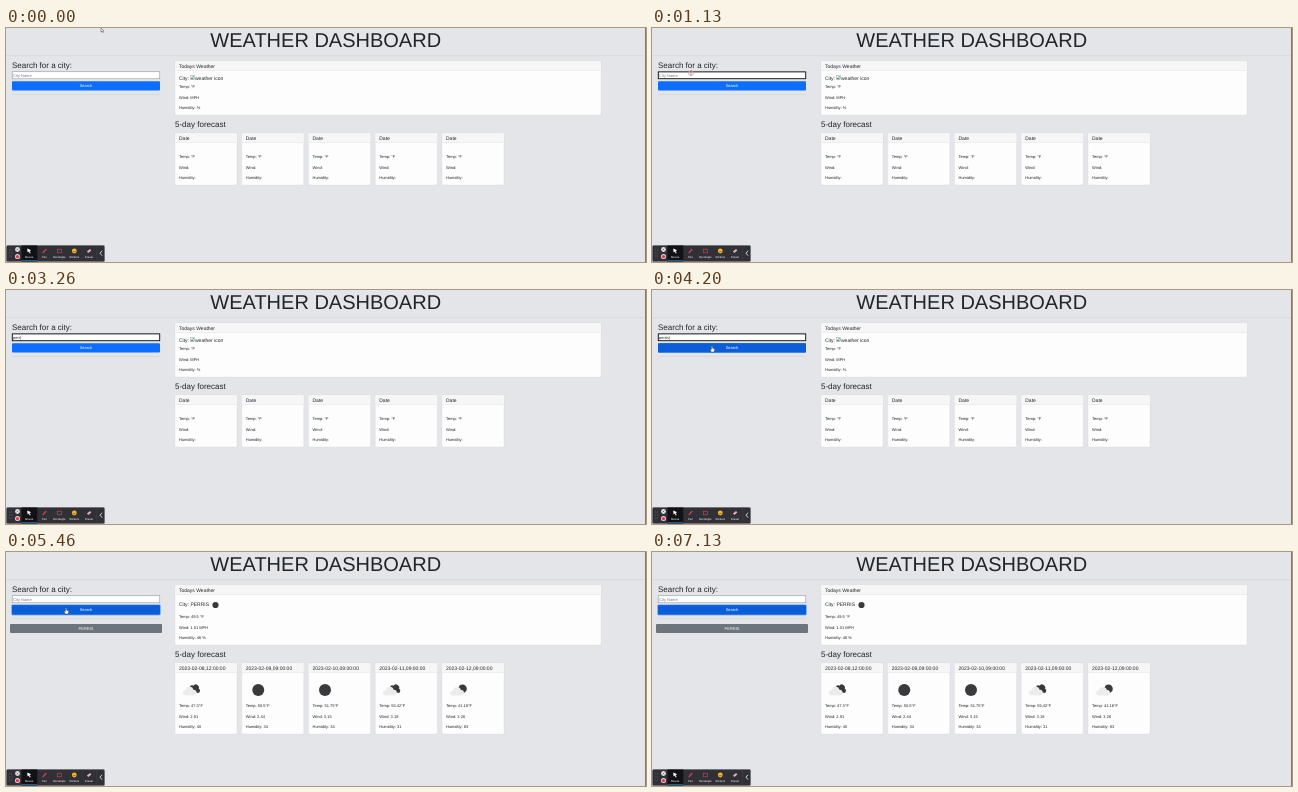
An HTML page for the animation above (8000 ms loop, 640x234 px).

```html
<!DOCTYPE html>
<html lang="en">
<head>
<meta charset="utf-8">
<title>Weather Dashboard</title>
<style>
html, body { margin: 0; width: 100%; height: 100%; overflow: hidden; background: #e3e5e9; }
svg { display: block; width: 100vw; height: 100vh; }
text { font-family: "Liberation Sans", Arial, sans-serif; fill: #212529; text-rendering: geometricPrecision; white-space: pre; }
.mid { text-anchor: middle; }
.white { fill: #fff; }
.hint { fill: #777b80; }
#pointer { animation: travel 8s infinite; }
@keyframes travel {
  0%, .8% { transform: translate(95px, 0); animation-timing-function: ease-in-out; }
  11.5%, 48% { transform: translate(39px, 45px); }
  50% { transform: translate(40px, 47px); animation-timing-function: ease-out; }
  52.5%, 76.5% { transform: translate(60px, 56px); animation-timing-function: ease-in-out; }
  87%, 100% { transform: translate(11.5px, 228px); }
}
</style>
</head>
<body>
<svg id="stage" viewBox="0 0 640 234" preserveAspectRatio="none"></svg>
<script>
const LOOP = 8000;
const FOCUS = 1060, TYPE = 2200, HOVER = 4130, SUBMIT = 4400, RESULT = 5460, LEAVE = 6130, GONE = 6960;
let rules = '', ruleCount = 0;

// Wraps markup so that it is visible only between two times of the loop.
function during(from, to, markup) {
  const name = 'show' + ruleCount++;
  const pct = ms => (ms / LOOP * 100).toFixed(3) + '%';
  rules += `@keyframes ${name}{0%{opacity:${from ? 0 : 1}}` +
    (from ? `${pct(from)}{opacity:1}` : '') +
    (to < LOOP ? `${pct(to)}{opacity:0}` : '') +
    `100%{opacity:${to < LOOP ? 0 : 1}}}`;
  return `<g style="animation:${name} 8s step-end infinite">${markup}</g>`;
}

const text = (x, y, size, value, cls = '') =>
  `<text x="${x}" y="${y}" font-size="${size}" class="${cls}">${value}</text>`;
const rect = (x, y, w, h, fill, extra = '') =>
  `<rect x="${x}" y="${y}" width="${w}" height="${h}" fill="${fill}" ${extra}/>`;
const circle = (x, y, r, fill) => `<circle cx="${x}" cy="${y}" r="${r}" fill="${fill}"/>`;
const path = (d, extra) => `<path d="${d}" ${extra}/>`;
const at = (x, y, markup) => `<g transform="translate(${x} ${y})">${markup}</g>`;

function card(x, y, w, h, header, lines, firstLine, gaps = [0, 11, 21]) {
  return rect(x, y, w, h, '#fdfdfd', 'rx="1" stroke="#d2d4d7" stroke-width=".3"') +
    rect(x + .2, y + .2, w - .4, 9.6, '#f6f6f7', 'rx=".8"') +
    rect(x, y + 9.7, w, .3, '#d5d6d9') +
    text(x + 4, y + 6.6, 5, header) +
    lines.map((line, i) => text(x + 4, firstLine + gaps[i], 4, line)).join('');
}

const DARK = '#3a3a3c';
const lump = (x, y, s, fill) => at(x, y, `<g transform="scale(${s})">` +
  circle(-4, 1.5, 2.4, fill) + circle(0, -.6, 3.7, fill) + circle(4, 1.3, 2.6, fill) +
  rect(-4, .5, 8, 3.4, fill) + '</g>');
const icons = {
  clear: circle(0, 0, 6, DARK),
  broken: `<g transform="rotate(32 4 -2)">${lump(4, -2, .85, DARK)}</g>` + lump(-2, 1.2, 1.05, '#ececed'),
  few: circle(4, -1.3, 4.3, DARK) + lump(-1.5, 1.4, 1.05, '#ececed')
};

const cardX = i => 169 + i * 66.75;
const emptyDays = [0, 1, 2, 3, 4].map(i =>
  card(cardX(i), 105, 62, 52, 'Date', ['Temp: °F', 'Wind:', 'Humidity:'], 130.4)).join('');
const days = [
  ['2023-02-08,12:00:00', 'broken', '47.3', '2.91', 40],
  ['2023-02-09,09:00:00', 'clear', '50.5', '2.44', 34],
  ['2023-02-10,09:00:00', 'clear', '51.75', '3.15', 34],
  ['2023-02-11,09:00:00', 'broken', '55.42', '3.18', 31],
  ['2023-02-12,09:00:00', 'few', '41.18', '3.26', 83]
].map(([date, icon, temp, wind, humidity], i) =>
  card(cardX(i), 111, 62, 71, date, [`Temp: ${temp}°F`, `Wind: ${wind}`, `Humidity: ${humidity}`], 155.4) +
  at(cardX(i) + 16.5, 138, icons[icon])).join('');

const brokenImage = at(184.5, 47.6,
  rect(0, 0, 4, 4, '#f4f7fb', 'stroke="#8b9096" stroke-width=".4"') +
  path('M.3 3.7V2.6L1.6 1.7L3.7 3.7Z', 'fill="#51a351"') +
  path('M1.5 .3H3.7V2.4Z', 'fill="#79a9dd"'));

const before =
  card(169, 33, 426, 54, 'Todays Weather', ['Temp: °F', 'Wind: MPH', 'Humidity: %'], 60.4) +
  text(173, 51.8, 5, 'City:') + brokenImage + text(189, 51.8, 5, 'weather icon') +
  text(169, 98.9, 8, '5-day forecast') + emptyDays;

const after =
  card(169, 33, 426, 60, 'Todays Weather', ['Temp: 49.5 °F', 'Wind: 1.01 MPH', 'Humidity: 46 %'], 66.4) +
  text(173, 54.2, 5, 'City: PERRIS') + circle(209.5, 53, 3.1, DARK) +
  text(169, 104.9, 8, '5-day forecast') + days +
  rect(4, 72, 152, 9, '#6c757d', 'rx="1"') + text(80, 77.9, 4, 'PERRIS', 'mid white');

// Search form
const word = 'perris';
const keyTime = i => i < word.length ? TYPE + i * 270 : SUBMIT;
const typed = [...word].map((_, i) =>
  during(keyTime(i), keyTime(i + 1), text(7, 48.6, 4, word.slice(0, i + 1) + '|'))).join('');
const hint = text(7, 48.6, 4, 'City Name', 'hint');
const button = fill => rect(6, 53.2, 148, 9.4, fill, 'rx="1"');
const form =
  text(6, 39.6, 8, 'Search for a city:') +
  rect(6.2, 43.8, 147.6, 7, '#fff', 'stroke="#85888c" stroke-width=".5"') +
  during(FOCUS, SUBMIT, rect(6.3, 43.9, 147.4, 6.8, 'none', 'stroke="#17181a" stroke-width=".9"')) +
  during(0, TYPE, hint) + typed + during(SUBMIT, LOOP, hint) +
  during(SUBMIT, LOOP, rect(5, 52.2, 150, 11.4, '#8ab5f3', 'rx="1.8"')) +
  button('#0d6efd') + during(HOVER, LOOP, button('#0b5ed7')) +
  text(80, 59.3, 4, 'Search', 'mid white') +
  rect(6, 66.3, 148, .4, '#c6c9ce');

// Recorder toolbar
const red = '#d93a4c';
const tools = [
  ['Mouse', 23.2, path('M-2 -2.6L2 -.8L.3 -.1L1.5 2L.6 2.5L-.5 .4L-1.6 1.4Z', 'fill="#fff"')],
  ['Pen', 38.5, path('M-1.8 2L1.8 -2', `stroke="${red}" stroke-width="1.3"`)],
  ['Rectangle', 53.3, rect(-2, -1.8, 4, 3.6, 'none', `stroke="${red}" stroke-width=".7"`)],
  ['Stickers', 68.3, circle(0, 0, 2.4, '#f3b62f') + rect(-1.2, .4, 2.4, .7, '#7b4a1c')],
  ['Eraser', 83.2, path('M-1.6 1.3L1.5 -1.3', 'stroke="#e4b3c2" stroke-width="2"')]
];
const toolbar =
  rect(0, 217, 99, 17, '#b9bbc0', 'rx="1.5"') +
  rect(.5, 217.5, 98, 16, '#303036', 'rx="1.2"') +
  rect(15.5, 217.5, 15.8, 16, '#121216') +
  rect(15.5, 232.3, 15.8, .8, '#267fb5') +
  [222, 225, 228].map(y => circle(3.8, y, .4, '#8c8c92') + circle(5.2, y, .4, '#8c8c92')).join('') +
  circle(11.5, 221.5, 2.4, '#e4e4e6') +
  path('M10.7 220.7L12.3 222.3M12.3 220.7L10.7 222.3', 'stroke="#44444a" stroke-width=".5"') +
  circle(11.5, 228.6, 2.5, '#e6e2e4') + circle(11.5, 228.6, 1.7, red) +
  tools.map(([label, x, icon]) => at(x, 223, icon) + text(x, 229.6, 2.8, label, 'mid white')).join('') +
  rect(90.7, 217.5, .4, 16, '#4b4b52') +
  path('M96 222.8L94 225.2L96 227.6', 'fill="none" stroke="#fff" stroke-width=".8"');

// Pointer shapes, with the hot spot at the origin
const outline = 'fill="#fff" stroke="#222" stroke-width=".4" stroke-linejoin="round"';
const arrow = path('M0 0V4L1 3.1L1.7 4.6L2.3 4.3L1.7 2.9H2.9Z', outline);
const beam = path('M-.8 -2H.8M0 -2V2M-.8 2H.8', 'stroke="#55585c" stroke-width=".35"');
const hand = path('M-.6 .3Q0 -.5 .6 .3V2.2L2.6 2.8V4.4L2 6H-.7L-2 3.7Q-1.8 2.8 -.6 3.6Z', outline);
const ring = '<circle r="2.6" fill="#f6c9cd" fill-opacity=".35" stroke="#e58b94" stroke-width=".5"/>';
const pointer = '<g id="pointer">' +
  during(0, 860, arrow) +
  during(FOCUS, 1330, ring) + during(860, TYPE, beam) +
  during(4000, HOVER, beam) +
  during(SUBMIT, 4660, ring) + during(HOVER, LEAVE + 70, hand) +
  during(LEAVE + 70, GONE, arrow) + '</g>';

document.getElementById('stage').innerHTML =
  rect(0, 0, 640, 234, '#e3e5e9') +
  text(319.7, 19, 20, 'WEATHER DASHBOARD', 'mid') +
  rect(0, 27.6, 639, .5, '#c9cbd0') +
  form + during(0, RESULT, before) + during(RESULT, LOOP, after) +
  rect(639.3, 0, .7, 234, '#4a4b4e') +
  toolbar + pointer;
document.head.appendChild(document.createElement('style')).textContent = rules;
</script>
</body>
</html>
```
